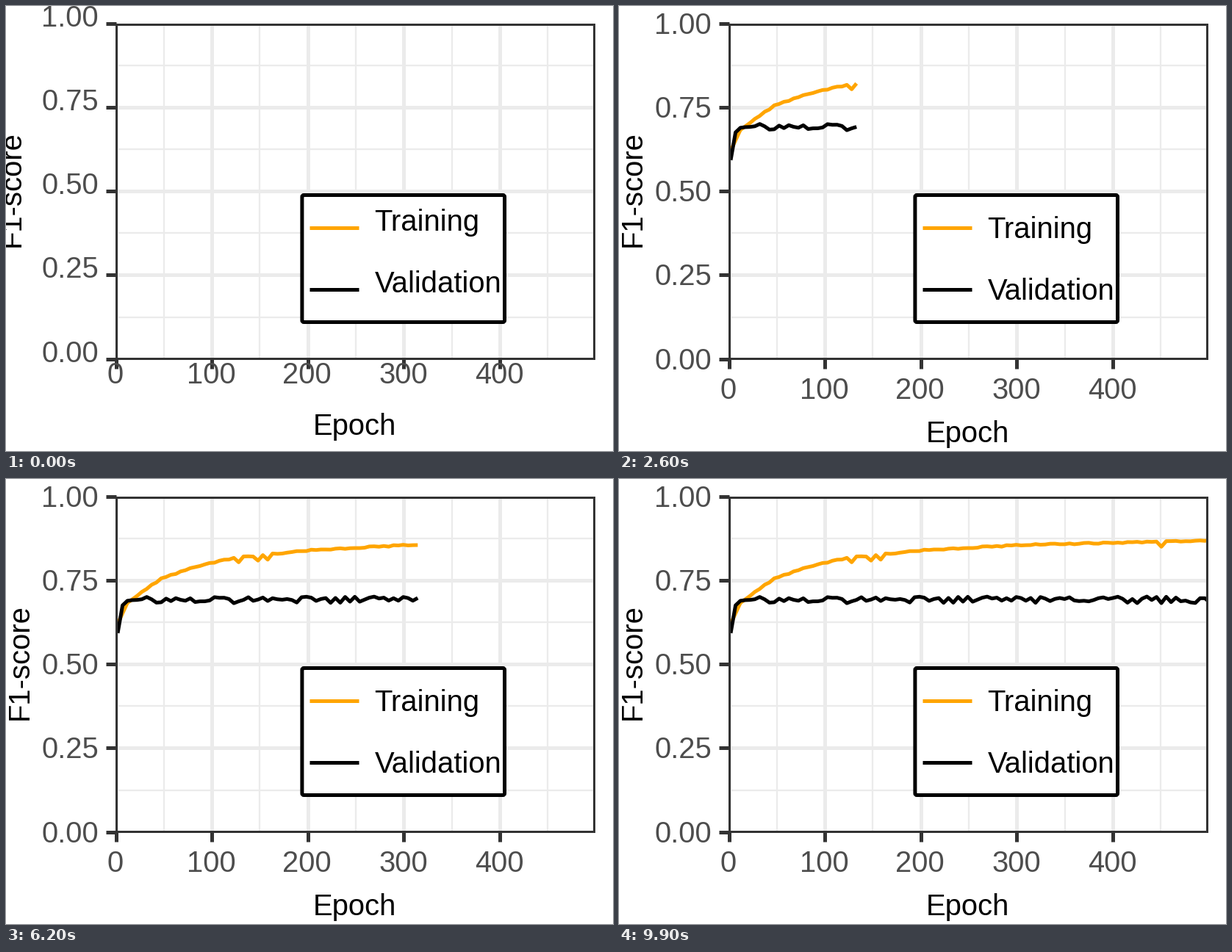
A matplotlib script that plays this animation: 826 px wide and 606 px high, repeating every 10 s.

```python
import numpy as np
import matplotlib.pyplot as plt
from matplotlib.animation import FuncAnimation
from matplotlib.patches import FancyBboxPatch, Rectangle

W, H, DPI = 826, 606, 100
FRAMES, INTERVAL = 100, 100
PT = 72 / DPI
LEFT, TOP, RIGHT, BOTTOM = 149.5, 24.5, 800, 480
EM = 40
DIGIT = 0.556 * EM
DARK, GREY, GRID = "#333333", "#4D4D4D", "#EBEBEB"
ORANGE = "#FFA500"

plt.rcParams["font.family"] = "Liberation Sans"


def epoch_x(epoch):
    return LEFT + 1.3065 * epoch


def score_y(score):
    return 480.6 - 456.6 * score


rng = np.random.default_rng(4)
steps = np.arange(FRAMES)
xs = 152 + 6.585 * steps

# Training climbs ever more slowly, with small jitter and a few dips
training = np.interp(steps, [0, 2, 9, 16, 24, 40, 59, 99],
                     [.621, .683, .756, .790, .817, .840, .855, .870])
training[5:] += rng.uniform(-.002, .002, FRAMES - 5)
training[[25, 29, 31, 89]] -= .015

# Validation jumps up at once, then wiggles around a flat level
validation = .692 - .099 * np.exp(-1.8 * steps)
validation[3:] += rng.uniform(-.01, .01, FRAMES - 3)

fig = plt.figure(figsize=(W / DPI, H / DPI), dpi=DPI, facecolor="white")
ax = fig.add_axes([0, 0, 1, 1])
ax.set_xlim(0, W)
ax.set_ylim(H, 0)
ax.axis("off")

panel = Rectangle((LEFT, TOP), RIGHT - LEFT, BOTTOM - TOP, fill=False,
                  ec=DARK, lw=3 * PT, joinstyle="miter", zorder=4)
ax.add_patch(panel)


def line(x, y, color, width, z, clip=False):
    item, = ax.plot(x, y, color=color, lw=width * PT, zorder=z,
                    solid_capstyle="butt", solid_joinstyle="round")
    if clip:
        item.set_clip_path(panel)
    return item


labels = []


def label(x, y, text, shift, color="black", **kw):
    """Add text at its baseline origin; shift applies in the opening frame."""
    item = ax.text(x, y, text, color=color, fontsize=EM * PT, ha="left",
                   va="baseline", zorder=8, **kw)
    labels.append((item, (x, y), shift))


for k in range(10):
    x = epoch_x(50 * k)
    major = k % 2 == 0
    line([x, x], [TOP, BOTTOM], GRID, 5 if major else 2.2, 1, True)
    if major:
        text = str(50 * k)
        line([x, x], [BOTTOM, BOTTOM + 14], DARK, 5, 5)
        label(x - 1 - DIGIT * len(text) / 2, 535, text, (0, -21), GREY)

for k in range(9):
    y = score_y(k / 8)
    major = k % 2 == 0
    line([LEFT, RIGHT], [y, y], GRID, 5 if major else 2.2, 1, True)
    if major:
        line([LEFT - 14, LEFT], [y, y], DARK, 5, 5)
        label(48, round(y + 14), f"{k / 8:.2f}", (0, -10), GREY)

label(418, 594, "Epoch", (0, -10))
label(30, 328, "F1-score", (-11, 0), rotation=90, rotation_mode="anchor")

ax.add_patch(FancyBboxPatch((402.9, 257.5), 275.6, 173,
                            boxstyle="round,pad=0,rounding_size=2.5",
                            fc="white", ec="black", lw=5 * PT, zorder=6))
for y, name, color in ((302, "Training", ORANGE),
                       (386, "Validation", "black")):
    line([413, 480], [y, y], color, 5, 7)
    label(501.5, y + 14, name, (0, -10))

curves = [
    (line([], [], ORANGE, 5, 2, True), score_y(training)),
    (line([], [], "black", 5, 3, True), score_y(validation)),
]


def update(i):
    n = i + 1 if i else 0
    for curve, ys in curves:
        curve.set_data(xs[:n], ys[:n])
    for item, (x, y), (dx, dy) in labels:
        item.set_position((x, y) if i else (x + dx, y + dy))
    return [curve for curve, _ in curves] + [item for item, *_ in labels]


anim = FuncAnimation(fig, update, frames=FRAMES, interval=INTERVAL,
                     init_func=lambda: update(0), repeat=True,
                     repeat_delay=0, blit=False)
plt.show()
```
